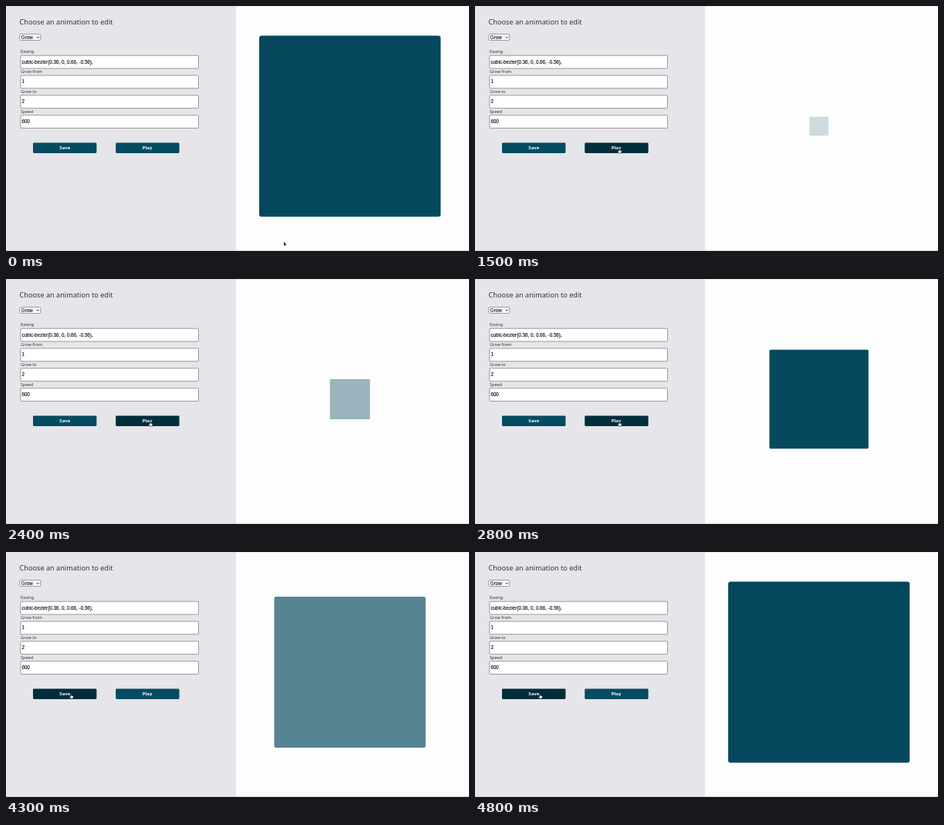
Animation of 600 by 318 pixels, one loop 5000 ms. Source, as an HTML page:

```html
<!DOCTYPE html>
<html lang="en">
<head>
<meta charset="utf-8">
<title>Animation editor</title>
<style>
  html, body { margin: 0; height: 100%; overflow: hidden; background: #fdfdfd; }
  svg { display: block; width: 100vw; height: 100vh; }
  text { font-family: "Noto Sans", "Open Sans", sans-serif; font-size: 5.6px; fill: #333338; }
  .title { font-size: 9.13px; }
  .value { font-family: "Liberation Sans", Arial, sans-serif; font-size: 6.28px; fill: #000; stroke: #000; stroke-width: .1; }
  .button { font-size: 6px; font-weight: 700; fill: #fff; text-anchor: middle; }
  .field { fill: #fff; stroke: #858589; stroke-width: .8; }
</style>
</head>
<body>
<svg viewBox="0 0 600 318">
  <rect width="600" height="318" fill="#fdfdfd"/>
  <rect width="298" height="318" fill="#e5e5ea"/>
  <path d="M0 .25H600" stroke="#d6d6d9" stroke-width=".5"/>
  <path d="M0 317.6H600" stroke="#cfcfd2" stroke-width=".8"/>

  <text class="title" x="17.6" y="23.9">Choose an animation to edit</text>
  <rect class="field" x="17.8" y="36.5" width="27" height="8" rx="1.5"/>
  <text class="value" x="19.8" y="42.7">Grow</text>
  <path d="M39.6 39.8l1.6 1.7 1.6-1.7" fill="none" stroke="#111" stroke-width=".9"/>
  <g id="form"></g>

  <rect id="save" x="35" y="177.6" width="82.4" height="13.4" rx="1.4"/>
  <text class="button" x="76.3" y="186.4">Save</text>
  <rect id="play" x="142.2" y="177.6" width="82.4" height="13.4" rx="1.4"/>
  <text class="button" x="183" y="186.4">Play</text>

  <rect id="square" fill="#05485e"/>
  <path id="arrow" d="M0 0V5.2L1.2 4.2 2 6 2.9 5.6 2.1 3.9H3.6Z" fill="#000" stroke="#fff" stroke-width=".35"/>
  <path id="hand" d="M-.8 .4Q-.2-.4 .4 .4V2.2L2.6 2.6Q3.2 2.8 3 4L2.5 6H-.7L-2.3 3.9Q-2.4 3-1.6 3.2L-.8 3.9Z" fill="#fff" stroke="#000" stroke-width=".6"/>
</svg>
<script>
const LOOP = 5000, STEP = 100, SPEED = 600, UNIT = 117.6;
const $ = id => document.getElementById(id);
const clamp = v => Math.min(1, Math.max(0, v));
const span = (t, a, b) => clamp((t - a) / (b - a));
const mix = (a, b, p) => a + (b - a) * p;
const inOut = p => p < .5 ? 4 * p ** 3 : 1 - 4 * (1 - p) ** 3;

// cubic-bezier(0, 0, .58, 1)
function easeOut(x) {
  let lo = 0, hi = 1;
  for (let i = 0; i < 20; i++) {
    const u = (lo + hi) / 2;
    if (1.74 * u * u * (1 - u) + u ** 3 < x) lo = u; else hi = u;
  }
  return lo * lo * (3 - 2 * lo);
}

const fields = [
  ["Easing", "cubic-bezier(0.36, 0, 0.66, -0.56),"],
  ["Grow from", "1"], ["Grow to", "2"], ["Speed", "600"]
];
$("form").innerHTML = fields.map(([label, value], i) => {
  const y = 64.2 + i * 25.85;
  return `<text x="18.9" y="${y - 2.9}">${label}</text>
    <rect class="field" x="18.9" y="${y}" width="230.6" height="16.8" rx=".8"/>
    <text class="value" x="20.4" y="${y + 10.4}">${value}</text>`;
}).join("");

// start time, scale from, scale to
const runs = [[1428, 0, 1.1], [2240, 0, 1.1], [4009, 1, 2]];

function drawSquare(t) {
  let scale = 2, alpha = 1;
  for (const [start, from, to] of runs) {
    if (t < start) break;
    alpha = easeOut(clamp((t - start) / SPEED));
    scale = mix(from, to, alpha);
  }
  const size = UNIT * scale, el = $("square");
  el.setAttribute("x", 445.7 - size / 2);
  el.setAttribute("y", 156 - size / 2);
  el.setAttribute("width", size);
  el.setAttribute("height", size);
  el.setAttribute("rx", 1.5 * scale);
  el.setAttribute("opacity", alpha);
}

function drawButton(id, dark) {
  const rgb = [[5, 1], [75, 46], [97, 59]].map(([a, b]) => Math.round(mix(a, b, dark)));
  $(id).setAttribute("fill", `rgb(${rgb})`);
}

function drawCursor(t) {
  const toPlay = inOut(span(t, 0, 800)), toSave = inOut(span(t, 3200, 3800));
  const x = mix(mix(360, 187, toPlay), 84.3, toSave);
  const y = mix(306, 183, inOut(span(t, 0, 600))) + 2 * span(t, 600, 800)
    + 3 * Math.sin(Math.PI * toSave) - .8 * toSave;
  const over = y > 178 && y < 191 && (x > 142 && x < 224 || x > 35 && x < 117);
  for (const id of ["arrow", "hand"]) {
    $(id).setAttribute("transform", `translate(${x} ${y})`);
    $(id).setAttribute("visibility", over === (id === "hand") ? "visible" : "hidden");
  }
}

function frame(now) {
  const t = Math.floor(now % LOOP / STEP) * STEP;
  drawSquare(t);
  drawButton("play", span(t, 1100, 1400) - span(t, 4000, 4300));
  drawButton("save", span(t, 3500, 3800));
  drawCursor(t);
  requestAnimationFrame(frame);
}
frame(0);
</script>
</body>
</html>
```
